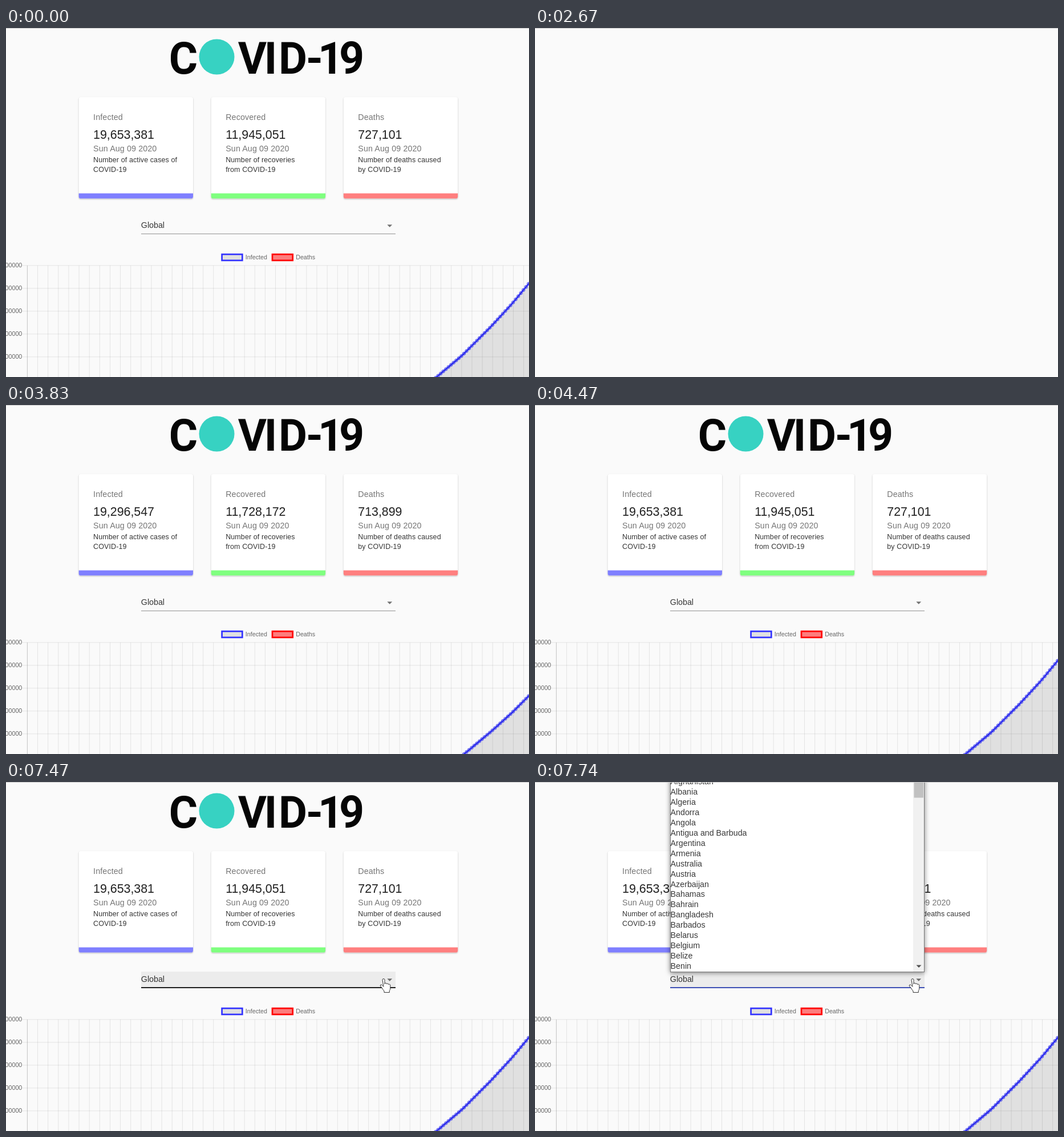
These frames come from a looping animation (917 px wide and 611 px high, 8 s). An HTML page with a canvas:

```html
<!DOCTYPE html>
<html lang="en">
<head>
<meta charset="utf-8">
<title>Case dashboard</title>
<style>
  html, body { margin: 0; width: 100%; height: 100%; overflow: hidden; background: #fafafa; }
  canvas, svg { position: absolute; left: 0; top: 0; width: 917px; height: 611px; }
  text { font-family: "Liberation Sans", Arial, sans-serif; }
  .title text { font: 700 77px "Liberation Sans Narrow", Roboto, sans-serif; text-anchor: middle; fill: #050505; }
  .card { filter: drop-shadow(0 1px 1px rgba(0, 0, 0, .24)); }
  .popup { filter: drop-shadow(0 1px 4px rgba(0, 0, 0, .5)); }
</style>
</head>
<body>
<canvas id="chart" width="917" height="611"></canvas>
<svg id="page" viewBox="0 0 917 611"></svg>
<script>
const LOOP = 8000, W = 917, H = 611;
const ctx = document.getElementById('chart').getContext('2d');
const page = document.getElementById('page');

function add(parent, name, attrs = {}, content) {
  const node = document.createElementNS('http://www.w3.org/2000/svg', name);
  set(node, attrs);
  if (content !== undefined) node.textContent = content;
  return parent.appendChild(node);
}
function set(node, attrs) {
  for (const key in attrs) node.setAttribute(key, attrs[key]);
}
function label(parent, x, y, size, alpha, content, spacing = 0) {
  return add(parent, 'text', {
    x, y, 'font-size': size, 'letter-spacing': spacing, fill: `rgba(0,0,0,${alpha})`
  }, content);
}
const show = (node, on) => { node.style.display = on ? '' : 'none'; };
const move = (node, x, y) => node.setAttribute('transform', `translate(${x} ${y})`);
const clamp = v => Math.min(1, Math.max(0, v));

// Title
const title = add(page, 'g', { class: 'title' });
const letters = [['C', 311], ['V', 432], ['I', 464], ['D', 503], ['-', 541], ['1', 569], ['9', 606]];
for (const [char, x] of letters) add(title, 'text', { x, y: 80 }, char);
add(title, 'circle', { cx: 369.5, cy: 50.5, r: 31, fill: '#37d2c2' });

// Cards
const cards = add(page, 'g');
const counters = [
  ['Infected', 19653381, '#7f7fff', 'Number of active cases of', 'COVID-19'],
  ['Recovered', 11945051, '#7fff7f', 'Number of recoveries', 'from COVID-19'],
  ['Deaths', 727101, '#ff7f7f', 'Number of deaths caused', 'by COVID-19']
].map(([name, total, color, line1, line2], i) => {
  const x = 127.6 + i * 232.1, tx = x + 25.5;
  const card = add(cards, 'g', { class: 'card' });
  add(card, 'rect', { x, y: 121, width: 200.4, height: 177.5, rx: 3.6, fill: '#fff' });
  add(card, 'path', {
    d: `M${x} 289.6h200.4v5.3q0 3.6-3.6 3.6h-193.2q-3.6 0-3.6-3.6z`, fill: color
  });
  label(cards, tx, 161, 14.25, .54, name, .13);
  const value = label(cards, tx, 193.8, 21.35, .87, '');
  label(cards, tx, 216, 14.25, .54, 'Sun Aug 09 2020', .13);
  label(cards, tx, 234.8, 12.45, .8, line1, .13);
  label(cards, tx, 252.3, 12.45, .8, line2, .13);
  return { value, total };
});

const loading = label(page, 470, 27, 14.25, .87, 'Loading...');
loading.setAttribute('text-anchor', 'middle');

// Country picker
const picker = add(page, 'g');
const pickerFill = add(picker, 'rect', { x: 237, y: 332, width: 446, height: 28, fill: 'rgba(0,0,0,.055)' });
label(picker, 236.8, 350, 14.25, .78, 'Global');
const caret = add(picker, 'path', { d: 'M668.3 344.3h8.9l-4.45 4.5z', fill: 'rgba(0,0,0,.54)' });
const line = add(picker, 'rect', { x: 237 });
const focusLine = add(picker, 'rect', { y: 359, height: 2, fill: '#3f51b5' });

// Drop-down list
const popup = add(page, 'g', { class: 'popup' });
const sheet = add(popup, 'rect', { x: 237, y: -20, width: 446, height: 352.5 });
const list = add(popup, 'g');
add(list, 'rect', { x: 237.5, y: -20, width: 445, height: 352.5, fill: '#fff', stroke: '#777' });
const countries = ['Afghanistan', 'Albania', 'Algeria', 'Andorra', 'Angola', 'Antigua and Barbuda',
  'Argentina', 'Armenia', 'Australia', 'Austria', 'Azerbaijan', 'Bahamas', 'Bahrain', 'Bangladesh',
  'Barbados', 'Belarus', 'Belgium', 'Belize', 'Benin'];
countries.forEach((name, i) => label(list, 237.6, 4.2 + i * 17.93, 14.25, .78, name));
add(list, 'rect', { x: 663, y: -2, width: 19, height: 334, fill: '#f1f1f1' });
add(list, 'rect', { x: 664.5, y: -2, width: 16.5, height: 29.5, fill: '#c1c1c1' });
add(list, 'path', { d: 'M668.5 320.5h9l-4.5 4.5z', fill: '#505050' });

add(page, 'rect', { width: W, height: 1, fill: '#c9c9c9' });

// Pointers, both with the hot spot at 0,0
const outline = { fill: '#fff', stroke: '#333', 'stroke-width': 1, 'stroke-linejoin': 'round' };
const arrow = add(page, 'path', {
  ...outline, d: 'M.5.5v18l4.2-3.8 2.9 6.7 3-1.3-2.9-6.5h5.9z'
});
const hand = add(page, 'path', {
  ...outline,
  d: 'M-2 1.5q0-2 2-2t2 2v7q0-1.5 1.7-1.5t1.8 1.7q.3-1 1.8-.8t1.6 1.8q.3-.8 1.5-.6t1.4 1.8v5' +
     'q0 3-1.5 4.5v3h-9.3v-2.4q-1.8-2-3.4-5l-2.9-3.3q-1.2-2 .3-2.7t3.4 1.7l1.6 1.6z'
});

// Chart
const BASE = 815.8, TOP = 415.8;
const curve = [[650, 688], [700, 653], [755, 611], [800, 573], [850, 523], [887, 483], [917, 447], [943, 422]];
function curveY(x) {
  const i = Math.max(1, curve.findIndex(point => point[0] >= x));
  const [x0, y0] = curve[i - 1], [x1, y1] = curve[i];
  return y0 + (y1 - y0) * (x - x0) / (x1 - x0);
}
const narrow = { axis: 31, gap: 18.35, row: 40.7 };
const wide = { axis: 37, gap: 18.13, row: 40 };

function stroke(x0, y0, x1, y1, alpha) {
  ctx.strokeStyle = `rgba(0,0,0,${alpha})`;
  ctx.beginPath();
  ctx.moveTo(x0, y0);
  ctx.lineTo(x1, y1);
  ctx.stroke();
}
function legend(x, name, color, fill) {
  ctx.fillStyle = fill;
  ctx.fillRect(x, 396.2, 35.7, 10.7);
  ctx.strokeStyle = color;
  ctx.lineWidth = 2.7;
  ctx.strokeRect(x, 396.2, 35.7, 10.7);
  ctx.fillStyle = '#666';
  ctx.textAlign = 'left';
  ctx.fillText(name, x + 41.2, 405);
}
function drawChart(layout, rise, dy) {
  const { axis, gap, row } = layout;
  ctx.save();
  ctx.translate(0, dy);
  ctx.font = '10.7px "Liberation Sans", Arial, sans-serif';
  legend(378.6, 'Infected', '#3333ff', 'rgba(0,0,0,.1)');
  legend(467, 'Deaths', '#ff0000', 'rgba(255,0,0,.5)');

  ctx.lineWidth = .9;
  for (let i = 0; axis + i * gap < W; i++) {
    const x = axis + i * gap + .4;
    stroke(x, TOP, x, H - dy, i ? .1 : .25);
  }
  ctx.textAlign = 'right';
  ctx.fillStyle = '#666';
  for (let i = 0; i < 8; i++) {
    const y = TOP + i * row;
    stroke(axis - 8.5, y, W, y, .1);
    ctx.fillText(String(2e7 - i * 2e6), axis - 8.7, y + 3.3);
  }

  if (rise > 0) {
    const points = [];
    for (let day = 140; day <= 200; day++) {
      const x = axis + day * gap / 4;
      points.push([x, BASE - (BASE - curveY(Math.min(x, 943))) * rise]);
    }
    const path = new Path2D();
    for (const [x, y] of points) path.lineTo(x, y);
    const area = new Path2D(path);
    area.lineTo(points[points.length - 1][0], BASE);
    area.lineTo(points[0][0], BASE);
    ctx.fillStyle = 'rgba(0,0,0,.1)';
    ctx.fill(area);
    ctx.strokeStyle = '#3333ff';
    ctx.lineWidth = 2.7;
    ctx.stroke(path);
    ctx.lineWidth = .9;
    for (const [x, y] of points) {
      ctx.beginPath();
      ctx.arc(x, y, 2.7, 0, 7);
      ctx.fill();
      ctx.stroke();
    }
  }
  ctx.restore();
}

// Uneven refresh while the page loads, then one step every 80 ms
function loadTime(t) {
  if (t < 3130) return 2980;
  if (t < 3210) return 3130;
  if (t < 3360) return 3210;
  if (t < 3830) return 3360;
  return 3830 + Math.floor((t - 3830) / 80) * 80;
}
const countEase = u => (1 - 2 ** (-10 * u)) * 1024 / 1023;
const riseEase = u => 1 - (1 - u) ** 4;

function drawPointer(t) {
  const u = clamp(Math.floor((t - 6610) / 80) / 9);
  const s = u * u * (3 - 2 * u), r = 1 - s;
  const x = r * r * 891 + 2 * r * s * 745 + s * s * 662;
  const y = r * r * 218 + 2 * r * s * 250 + s * s * 345;
  const hover = t >= 6610 && y > 331;
  show(arrow, t >= 6610 && !hover);
  show(hand, hover);
  move(arrow, x, y);
  move(hand, x, y);
  return hover;
}

function render(t) {
  const reloading = t >= 2670 && t < 4470;
  const blank = t >= 2670 && t < 2830;
  const waiting = t >= 2830 && t < 2980;
  const noBar = t >= 2830 && t < 3130;
  const noImage = t >= 2670 && t < 3360;
  const dy = noImage ? -73 : 0;
  const now = loadTime(t);

  show(title, !noImage);
  show(loading, waiting);
  show(cards, !blank && !waiting);
  move(cards, noBar ? 10.5 : 0, dy);
  const progress = reloading ? countEase(clamp((now - 3000) / 1453.81)) : 1;
  for (const { value, total } of counters) {
    value.textContent = Math.floor(total * progress).toLocaleString('en-US');
  }

  ctx.clearRect(0, 0, W, H);
  if (t < 2670 || t >= 3130) {
    const settling = reloading && t < 3830;
    const rise = reloading ? riseEase(clamp((now - 3470) / 1000)) : 1;
    drawChart(settling ? narrow : wide, rise, dy);
  }

  const hover = drawPointer(t);
  const focus = t >= 7470;
  show(picker, !blank);
  move(picker, noBar ? 7 : 0, waiting ? -302 : dy);
  set(line, {
    y: hover ? 359 : 359.9, width: noBar ? 452 : 446, height: hover ? 2 : 1,
    fill: hover ? 'rgba(0,0,0,.87)' : 'rgba(0,0,0,.42)'
  });
  move(caret, noBar ? 6 : 0, 0);
  show(pickerFill, focus);
  const span = t < 7550 ? 0 : t < 7620 ? 260 : t < 7740 ? 420 : 446;
  set(focusLine, { x: 460 - span / 2, width: span });

  show(popup, t >= 7550);
  show(sheet, t < 7620);
  show(list, t >= 7620);
}

const start = performance.now();
function tick() {
  render((performance.now() - start) % LOOP);
  requestAnimationFrame(tick);
}
tick();
</script>
</body>
</html>
```
